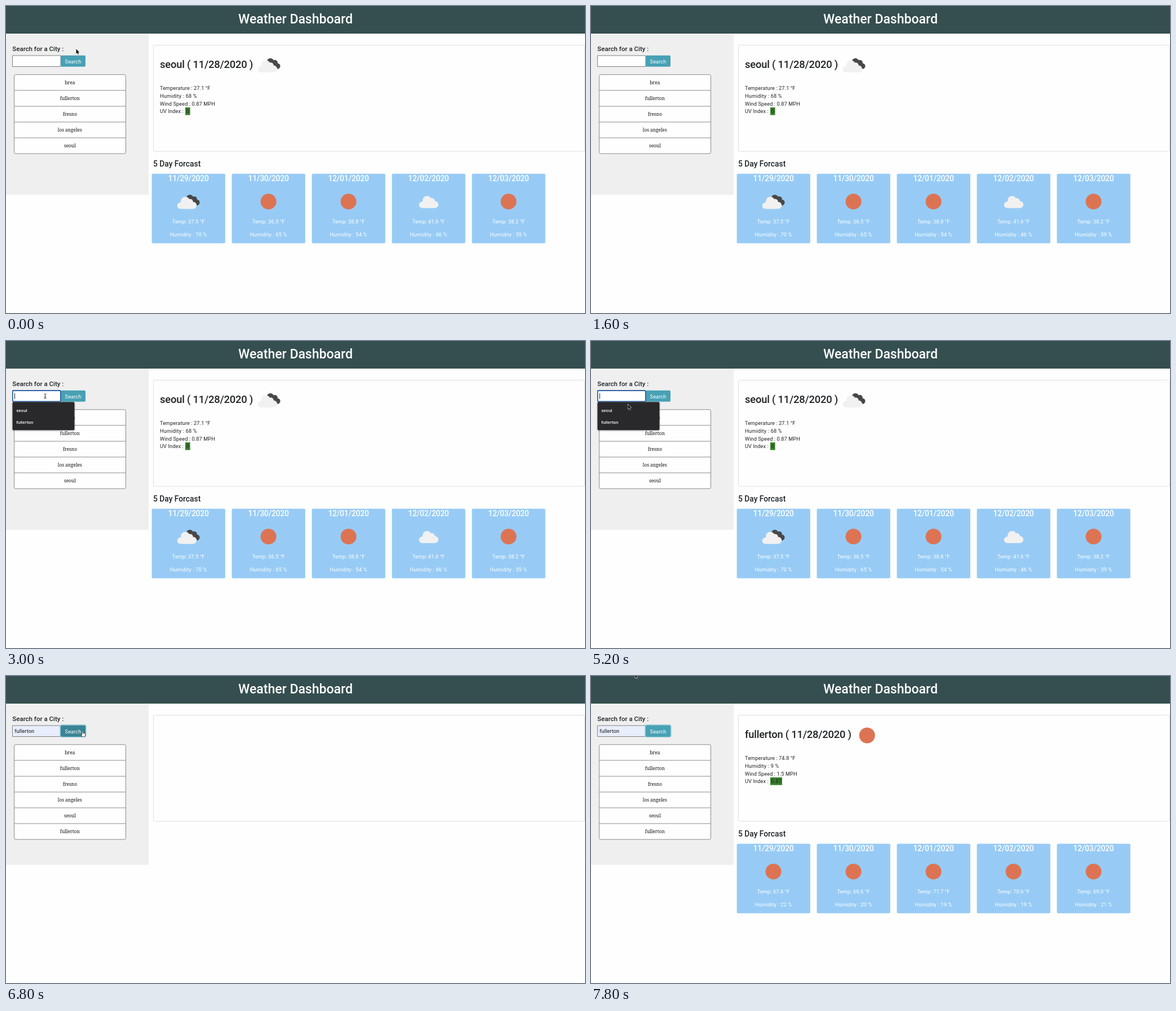
Animation of 1027x545 px, one loop 8000 ms. Source, as an HTML page with a canvas:

```html
<!DOCTYPE html>
<html lang="en">
<head>
<meta charset="utf-8">
<title>Weather Dashboard</title>
<style>
  html, body { margin: 0; width: 100%; height: 100%; overflow: hidden; background: #fefefe; }
  canvas { display: block; width: 1027px; height: 545px; }
</style>
</head>
<body>
<canvas id="stage"></canvas>
<script>
const W = 1027, H = 545, LOOP = 8000, STEP = 200;
const SANS = 'Roboto, "Noto Sans", sans-serif';
const SERIF = '"Noto Serif", Georgia, serif';
const INK = '#1f2327', PAPER = '#fefefe';

const canvas = document.getElementById('stage');
const ctx = canvas.getContext('2d');
const ratio = window.devicePixelRatio || 1;
canvas.width = W * ratio;
canvas.height = H * ratio;

const cities = ['brea', 'fullerton', 'fresno', 'los angeles', 'seoul'];
const dates = ['11/29/2020', '11/30/2020', '12/01/2020', '12/02/2020', '12/03/2020'];
const seoul = {
  title: 'seoul ( 11/28/2020 )', icon: 'broken', iconX: 466.5,
  temp: '27.1', humidity: 68, wind: '0.87', uv: '0', uvWidth: 8.6,
  days: [['broken', '37.5', 70], ['sun', '36.5', 65], ['sun', '38.8', 54],
         ['cloud', '41.6', 46], ['sun', '38.2', 59]]
};
const fullerton = {
  title: 'fullerton ( 11/28/2020 )', icon: 'sun', iconX: 489.7,
  temp: '74.8', humidity: 9, wind: '1.5', uv: '0.87', uvWidth: 21,
  days: [['sun', '67.6', 22], ['sun', '69.6', 20], ['sun', '71.7', 19],
         ['sun', '70.6', 19], ['sun', '69.0', 21]]
};

// Pointer stops: time, shape, x, y
const pointer = [
  [0, 'arrow', 124.5, 76.5], [200, 'arrow', 104, 52], [400, 'arrow', 61, 18], [600, 'none'],
  [2000, 'arrow', 82, 16], [2200, 'arrow', 146, 71], [2400, 'arrow', 128, 81],
  [2600, 'beam', 84, 97], [2800, 'beam', 69.5, 98],
  [5200, 'arrow', 65.5, 112.5], [5400, 'arrow', 63, 124], [5600, 'arrow', 60, 140],
  [6200, 'arrow', 98, 122], [6400, 'hand', 128, 104], [6600, 'hand', 137, 102.5],
  [7200, 'arrow', 190, 120], [7400, 'arrow', 276, 153], [7600, 'arrow', 196, 75],
  [7800, 'arrow', 77.5, -5]
];

function text(str, x, y, size, { weight = 400, color = INK, align = 'left', gap = 0, family = SANS } = {}) {
  ctx.font = `${weight} ${size}px ${family}`;
  ctx.letterSpacing = gap + 'px';
  ctx.textAlign = align;
  ctx.fillStyle = color;
  ctx.fillText(str, x, y);
}

function box(x, y, w, h, fill, { radius = 0, line, width = 1 } = {}) {
  ctx.beginPath();
  ctx.roundRect(x, y, w, h, radius);
  if (fill) { ctx.fillStyle = fill; ctx.fill(); }
  if (line) { ctx.strokeStyle = line; ctx.lineWidth = width; ctx.stroke(); }
}

function discs(color, list) {
  ctx.fillStyle = color;
  for (const [x, y, r] of list) {
    ctx.beginPath();
    ctx.arc(x, y, r, 0, Math.PI * 2);
    ctx.fill();
  }
}

function cloud(x, y) {
  discs('#f1f1f1', [[x - 11.2, y + 5.8, 5.7], [x - 2.5, y - 2, 8], [x + 6, y - 1, 5.2], [x + 11.3, y + 5.3, 6.2]]);
  box(x - 11.5, y - 1, 22.5, 12.5, '#f1f1f1', { radius: 2 });
}

function icon(kind, x, y) {
  if (kind === 'sun') discs('#dc7454', [[x, y, 14]]);
  if (kind === 'cloud') cloud(x, y);
  if (kind === 'broken') {
    discs('#484848', [[x + 2.5, y - 6, 6.2], [x + 10.3, y - 4.2, 5], [x + 14.8, y + 1.6, 5.2], [x + 8, y + 1, 5.5]]);
    cloud(x - 3, y + 1.5);
  }
}

function report(data) {
  const body = { gap: 0.1 };
  text(data.title, 273, 110, 18.4, { weight: 500, gap: -0.23 });
  icon(data.icon, data.iconX, data.icon === 'sun' ? 105.5 : 105);
  text(`Temperature : ${data.temp} °F`, 273, 149, 9.2, body);
  text(`Humidity : ${data.humidity} %`, 273, 162.8, 9.2, { gap: 0.2 });
  text(`Wind Speed : ${data.wind} MPH`, 273, 176.5, 9.2, body);
  text('UV Index :', 273, 190.3, 9.2, body);
  box(318, 180, data.uvWidth, 13.6, '#38802a');
  text(data.uv, 318 + data.uvWidth / 2, 190.3, 9.2, { align: 'center' });

  text('5 Day Forcast', 261, 284.8, 13.8, { weight: 500 });
  data.days.forEach(([kind, temp, humidity], i) => {
    const x = 258.6 + i * 141.95, mid = x + 65;
    const white = { color: '#fff', align: 'center', gap: 0.1 };
    box(x, 297.7, 130.3, 123.6, '#97cbf5', { radius: 2.5 });
    text(dates[i], mid, 311.2, 13.8, { ...white, weight: 500, gap: -0.15 });
    icon(kind, mid, 347.2);
    text(`Temp: ${temp} °F`, mid, 386.2, 9.2, white);
    text(`Humidity : ${humidity} %`, mid, 409, 9.2, { ...white, gap: 0.2 });
  });
}

function searchForm(t) {
  const focused = t >= 2800 && t < 6800;
  const value = t >= 5600 ? 'fullerton' : t >= 5400 ? 'seoul' : '';
  const hovered = t >= 6400 && t < 7200;

  text('Search for a City :', 11.3, 80, 11.5, { weight: 500 });
  box(11.5, 88, 85.5, 19.5, value ? '#e8eefb' : '#fff', { line: '#808080' });
  if (value) text(value, 15.2, 101.3, 9.2, { color: '#111', gap: 0.1 });

  if (t >= 6800) box(96.3, 87, 45.3, 21, null, { radius: 3, line: '#94cbd6', width: 2 });
  box(97, 87.7, 44, 20, hovered ? '#3a8496' : '#48a1b5', { radius: 2 });
  text('Search', 119, 101.9, 9.2, { color: '#fff', align: 'center', gap: 0.1 });

  if (focused) {
    box(11.8, 88, 85, 19.4, null, { radius: 1.5, line: '#2c62a6', width: 1.8 });
    const lit = Math.floor((t - 2750) / 500) % 2 === 0;
    if (lit && !value) box(15, 93, 1, 10, '#222');
  }
}

function history(t) {
  const names = t >= 6800 ? [...cities, 'fullerton'] : cities;
  box(14.5, 121.8, 198, 28.05 * names.length, PAPER, { radius: 2.5, line: '#8b8b8b' });
  names.forEach((name, i) => {
    const y = 121.8 + i * 28.05;
    if (i) box(14.5, y - 0.5, 198, 1, '#8b8b8b');
    text(name, 113.3, y + 16.7, 8.3, { family: SERIF, color: '#111', align: 'center' });
  });
}

function suggestions(t) {
  if (t < 2800 || t >= 6000) return;
  ctx.save();
  ctx.shadowColor = 'rgba(0,0,0,.35)';
  ctx.shadowBlur = 3 * ratio;
  ctx.shadowOffsetY = ratio;
  box(11.5, 108.3, 110, 50, '#29292c', { radius: 2 });
  ctx.restore();
  const active = t >= 5600 ? 1 : t >= 5400 ? 0 : -1;
  ['seoul', 'fullerton'].forEach((name, i) => {
    if (i === active) box(11.5, 113 + i * 20.6, 110, 20.6, '#48484b');
    text(name, 18.2, 126.2 + i * 20.6, 7.9, { weight: 500, color: '#f2f2f2', gap: 0.05 });
  });
}

function trace(points, fill, line, width) {
  ctx.beginPath();
  points.forEach(([x, y]) => ctx.lineTo(x, y));
  ctx.closePath();
  ctx.lineJoin = 'round';
  ctx.strokeStyle = line;
  ctx.lineWidth = width;
  ctx.stroke();
  ctx.fillStyle = fill;
  ctx.fill();
}

const shapes = {
  none() {},
  arrow() {
    trace([[0, 0], [0, 8.2], [1.9, 6.5], [3.2, 9.5], [4.5, 8.9], [3.2, 6], [5.7, 5.8]], '#111', '#e8e8e8', 1.1);
  },
  beam() {
    ctx.strokeStyle = '#222';
    ctx.lineWidth = 0.9;
    ctx.beginPath();
    ctx.moveTo(-2, -4.2);
    ctx.quadraticCurveTo(0, -4.2, 0, -2.8);
    ctx.lineTo(0, 2.8);
    ctx.quadraticCurveTo(0, 4.2, -2, 4.2);
    ctx.moveTo(2, -4.2);
    ctx.quadraticCurveTo(0, -4.2, 0, -2.8);
    ctx.moveTo(0, 2.8);
    ctx.quadraticCurveTo(0, 4.2, 2, 4.2);
    ctx.moveTo(-1.2, 1.4);
    ctx.lineTo(1.2, 1.4);
    ctx.stroke();
  },
  hand() {
    trace([[-1.6, -4], [-0.5, -4], [-0.3, -1], [2.8, -0.3], [3.6, 0.8], [3, 3.2], [2.5, 5],
           [-1.3, 5], [-3.6, 1.6], [-3.2, 0.9], [-1.6, 2]], '#fff', '#222', 1.2);
  }
};

function drawPointer(t) {
  const [, shape, x = 0, y = 0] = pointer.findLast(stop => stop[0] <= t);
  ctx.save();
  ctx.translate(x, y);
  shapes[shape]();
  ctx.restore();
}

function draw(t) {
  ctx.setTransform(ratio, 0, 0, ratio, 0, 0);
  box(0, 0, W, H, PAPER);
  box(0, 49, 253, 286.3, '#efefef');
  box(0, 0, W, 49, '#354e4f');
  text('Weather Dashboard', 513.5, 31, 23, { weight: 500, color: '#fff', align: 'center' });
  box(261.5, 69.5, 765, 188.5, null, { radius: 2, line: '#dfdfdf' });

  searchForm(t);
  history(t);
  suggestions(t);
  if (t < 6800) report(seoul);
  else if (t >= 7000) report(fullerton);

  if (t >= 1200 && t < 1600) {
    box(0, 533, 341.5, 12, '#343538', { radius: [0, 2, 0, 0] });
    text('Waiting for api.openweathermap.org...', 3, 541.7, 7, { color: '#d0d0d0', gap: 0.1 });
  }
  drawPointer(t);
}

const start = performance.now();
function tick() {
  const t = (performance.now() - start) % LOOP;
  draw(Math.floor(t / STEP) * STEP);
  requestAnimationFrame(tick);
}
tick();
</script>
</body>
</html>
```
